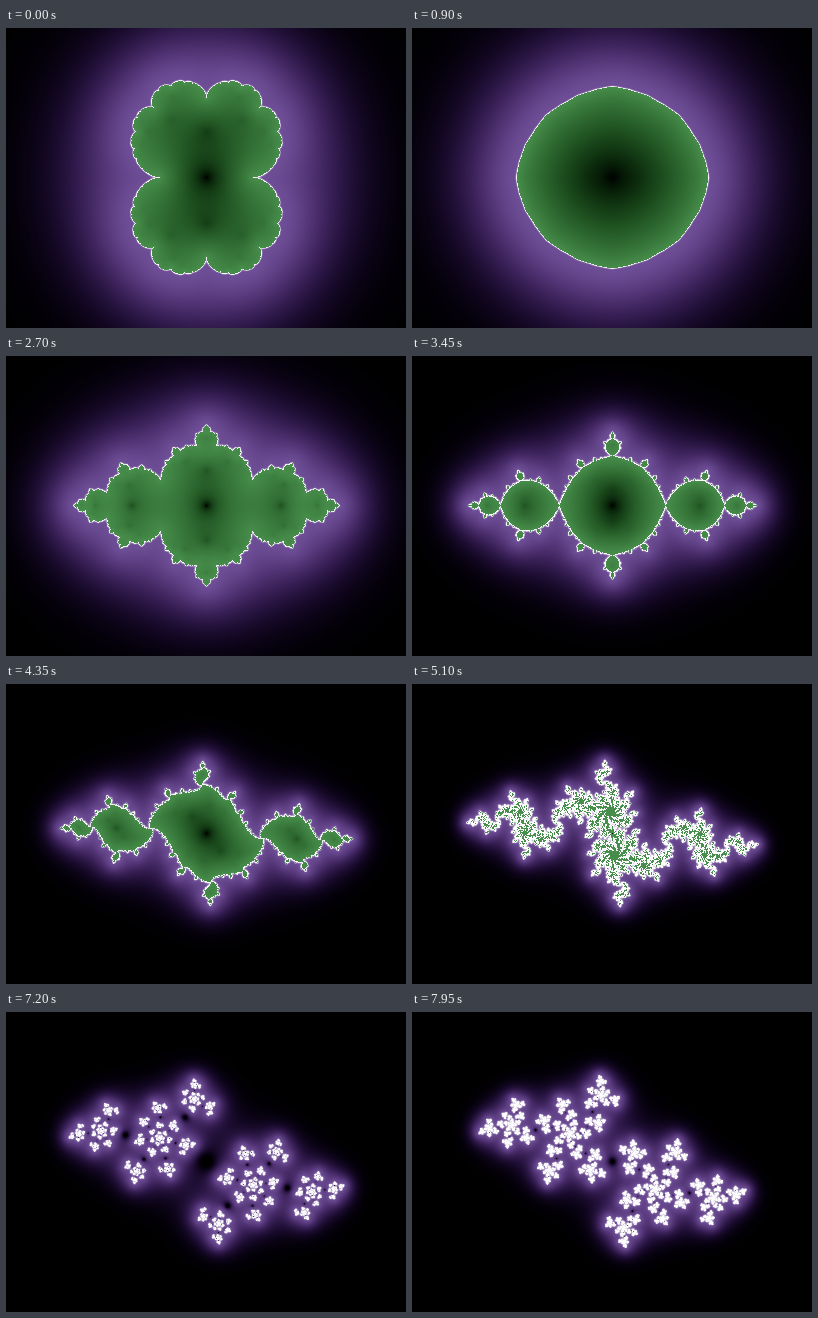
An HTML page with a canvas that plays this animation: 400 px wide and 300 px high, repeating every 8000 ms.

```html
<!DOCTYPE html>
<html>
<head>
<meta charset="utf-8">
<title>Julia set morph</title>
<style>
  html, body { margin: 0; width: 100%; height: 100%; overflow: hidden; background: #000; }
  canvas { display: block; width: 400px; height: 300px; }
</style>
</head>
<body>
<canvas id="stage" width="400" height="300"></canvas>
<script>
const W = 400, H = 300, SCALE = 90.9, CX = 200, CY = 149;
const LOOP = 8000, STEP = 150, MAX_ITER = 120, BAILOUT = 1e4;
const ctx = document.getElementById('stage').getContext('2d');
const image = ctx.createImageData(W, H);
const data = image.data;
data.fill(255);

// time in s, real and imaginary part of c, halo width
const path = [
  [0, 0.25, 0, 0.95],
  [1.95, -0.418, 0, 0.95],
  [3.65, -1, 0, 0.36],
  [5.1, -0.96, 0.254, 0.18],
  [6, -0.846, 0.375, 0.2],
  [7.2, -0.709, 0.519, 0.19],
  [7.95, -0.597, 0.587, 0.17]
];

function pathAt(t) {
  let i = 1;
  while (i < path.length - 1 && t > path[i][0]) i++;
  const a = path[i - 1], b = path[i];
  const u = (t - a[0]) / (b[0] - a[0]);
  return a.map((v, j) => v + (b[j] - v) * u);
}

function put(p, r, g, b) {
  data[p] = r;
  data[p + 1] = g;
  data[p + 2] = b;
}

function shade(p, x, y, cr, ci, halo) {
  let slope = 1, sum = 1, r2 = x * x + y * y, n = 0;
  for (; n < MAX_ITER && r2 < BAILOUT; n++) {
    slope *= 2 * Math.sqrt(r2);
    sum += slope;
    const nx = x * x - y * y + cr;
    y = 2 * x * y + ci;
    x = nx;
    r2 = x * x + y * y;
  }
  if (r2 < BAILOUT) {
    const v = 1 - Math.pow(sum, -0.8), tint = Math.pow(v, 1.5);
    put(p, 72 * tint, 142 * v, 76 * tint);
    return;
  }
  // distance estimate: white edge, then a violet halo
  const r = Math.sqrt(r2);
  const dist = r * Math.log(r) / Math.max(slope, 1e-12);
  const glow = Math.exp(-Math.pow(dist / halo, 1.5));
  const edge = Math.exp(-1.2 * (SCALE * dist) ** 2);
  const mix = v => v + (255 - v) * edge;
  put(p, mix(110 * Math.pow(glow, 1.2)), mix(78 * Math.pow(glow, 1.6)), mix(150 * glow));
}

function draw(t) {
  const [, cr, ci, halo] = pathAt(t);
  for (let j = 0, p = 0; j < H; j++)
    for (let i = 0; i < W; i++, p += 4)
      shade(p, (i - CX) / SCALE, (CY - j) / SCALE, cr, ci, halo);
  ctx.putImageData(image, 0, 0);
}

let shown = -1;
const start = performance.now();
function tick() {
  const step = Math.floor((performance.now() - start) % LOOP / STEP);
  if (step !== shown) {
    shown = step;
    draw(step * STEP / 1000);
  }
  requestAnimationFrame(tick);
}
tick();
</script>
</body>
</html>
```
